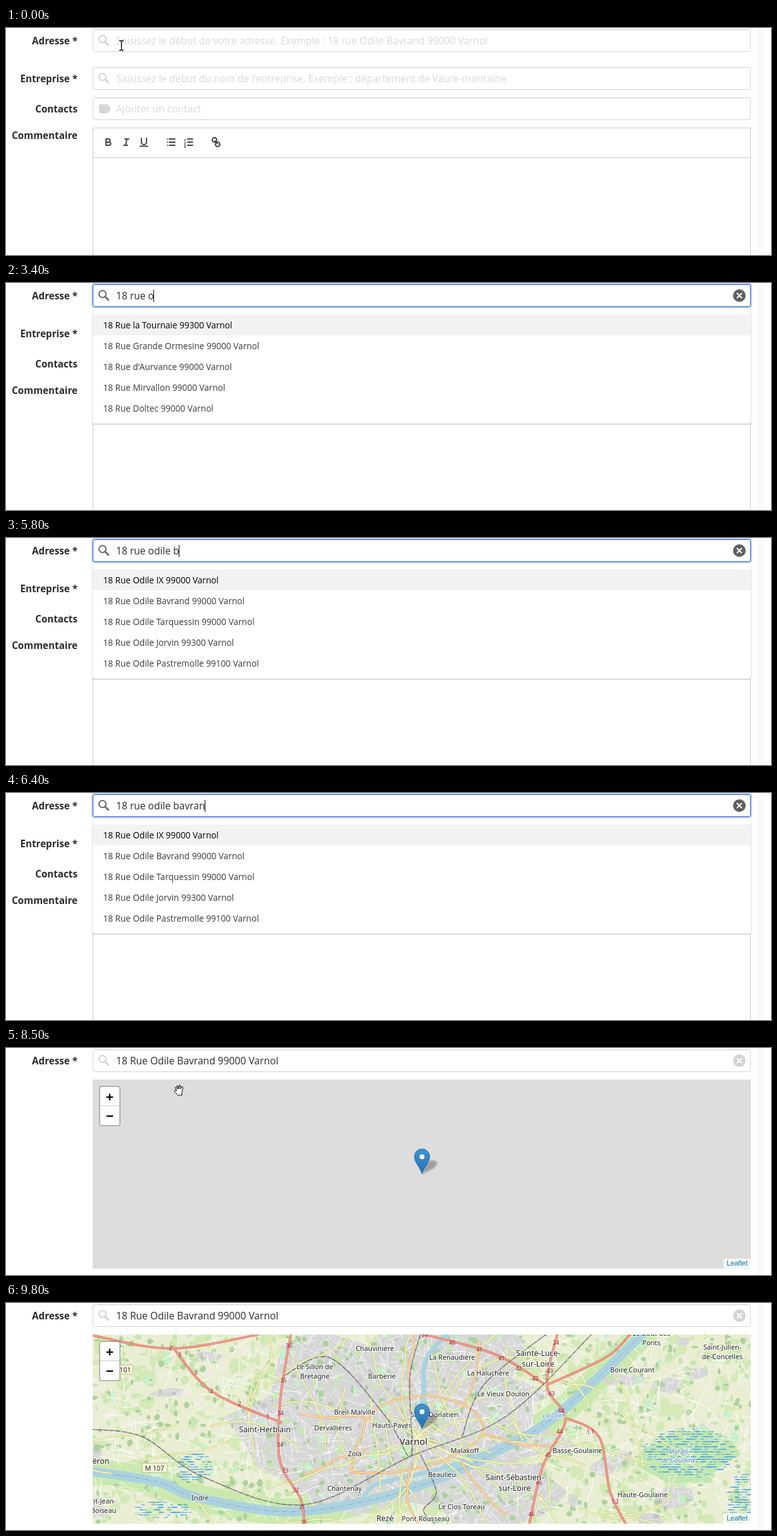
Recreate the animation shown at these times as an HTML page. Size 1209 by 360 pixels, loop 10 s.

```html
<!DOCTYPE html>
<html lang="fr">
<head>
<meta charset="utf-8">
<title>Saisie d'adresse</title>
<style>
html, body { margin: 0; width: 100%; height: 100%; overflow: hidden; background: #fff; }
svg { display: block; }
text { white-space: pre; font: 15.6px "Open Sans", "Noto Sans", sans-serif; fill: #2b2b2b; }
.label { font-weight: 700; font-size: 15.2px; text-anchor: end; }
.hint { fill: #d9d9d9; }
.option { font-size: 13.6px; fill: #383838; }
.first { fill: #000; }
.field { fill: #fff; stroke: #d4d4d4; }
.tool { fill: none; stroke: #444; stroke-width: 2; stroke-linecap: round; stroke-linejoin: round; }
.place { font-family: "Noto Sans", sans-serif; fill: #222; text-anchor: middle;
  paint-order: stroke; stroke: #fff; stroke-opacity: .7; stroke-width: 2.5px; stroke-linejoin: round; }
.water { font-style: italic; fill: #4f86b5; }
.exit { font: 8.5px "Noto Sans", sans-serif; fill: #9c1f38; text-anchor: middle; }
.zoom { font: bold 21px "Liberation Sans", Arial, sans-serif; fill: #000; text-anchor: middle; }
.credit { font: 11px "Liberation Sans", Arial, sans-serif; fill: #0078a8; }
</style>
</head>
<body>
<svg id="stage" width="1209" height="360" viewBox="0 0 1209 360"></svg>
<script>
const $ = id => document.getElementById(id);
const TOWN = 'Varnol';
const ADDRESS = `18 Rue Odile Bavrand 99000 ${TOWN}`;

// Bursts of typing: start, time per key, keys
const BURSTS = [[1600, 100, '18'], [2100, 100, ' rue '], [3400, 200, 'odil'], [5500, 150, 'e b'], [6000, 100, 'avrand']];

// Suggestions from a given time on; the digit completes the postcode
const LISTS = [
  [2500, "Rue la Tournaie 3|Rue Grande Ormesine 0|Rue d'Aurvance 0|Rue Mirvallon 0|Rue Doltec 0"],
  [3500, "Rue Octave Brimol 0|Rue des Ormelines 0|Rue d'Oustrelle 1|Rue Olvarde 0|Rue Orsenne 3"],
  [3900, "Rue Odette Larvin 0|Rue Odilon Tresque 0|Rue Odelin 1|Rue Odrance 0|Rue Odile IX 0"],
  [4400, "Rue Odile IX 0|Rue Odile Bavrand 0|Avenue Odile Tarquessin Morval 0|Rue Odile Jorvin 3|Allée Odile Pastremol 1"],
  [5600, "Rue Odile IX 0|Rue Odile Bavrand 0|Rue Odile Tarquessin 0|Rue Odile Jorvin 3|Rue Odile Pastremolle 1"],
  [6600, "Rue Odile Bavrand 0"]
];

/* ---------- form ---------- */
const text = (x, y, s, cls = '', extra = '') => `<text x="${x}" y="${y}" class="${cls}" ${extra}>${s}</text>`;
const field = (y, id = '') => `<rect id="${id}" class="field" x="137.5" y="${y + .5}" width="1039" height="35" rx="3"/>
  <path d="M140 ${y + 1.5}H1174" stroke="#f1f1f1"/>`;
const glass = (y, id = '') => `<g id="${id}" transform="translate(152.500 ${y})" fill="none" stroke="#d2d2d2" stroke-width="2">
  <circle r="5.500"/><path d="M4 4l6 6" stroke-width="2.600"/></g>`;
const tool = (x, d) => `<path class="tool" transform="translate(${x} 172)" d="${d}"/>`;
const rows3 = x => [4, 9, 14].map(y => `M${x} ${y}H15`).join('');
const link = 'M1 0a3.500 3.500 0 0 0-5-5 3.500 3.500 0 0 0 5 5z';

const form = `
  ${['Entreprise *', 'Contacts', 'Commentaire'].map((s, i) => text(113, [86, 134, 176][i], s, 'label')).join('')}
  ${field(62)}${glass(77.5)}
  ${text(174, 86, "Saisissez le début du nom de l'entreprise. Exemple : département de Vaure-maritaine", 'hint')}
  ${field(110)}
  <path d="M149 121H160q1 0 2 1l4 6-4 6q-1 1-2 1H149q-2 0-2-2V123q0-2 2-2z" fill="#d6d6d6"/>
  ${text(174, 134, 'Ajouter un contact', 'hint')}
  <path d="M137.500 361V158.500H1176.500V361M137.500 205.500H1176.500" fill="none" stroke="#c8c8c8"/>
  ${tool(153, 'M5 4H9a2.500 2.500 0 0 1 0 5H5zM5 9h5a2.500 2.500 0 0 1 0 5H5z')}
  ${tool(181, 'M7 4H13M5 14H11M8 14L10 4')}
  ${tool(209, 'M5 3V9a4 4 0 0 0 8 0V3M3 15.500H15')}
  ${tool(252, rows3(6) + 'M3 4h0M3 9h0M3 14h0')}
  ${tool(280, rows3(7))}
  ${[1, 2, 3].map(n => text(281, 174.5 + n * 5, n, '', 'style="font-size:6px;font-weight:700"')).join('')}
  ${tool(323, 'M7 7L11 11')}
  <g transform="translate(331 180)">${[0, 180].map(a => `<path class="tool" transform="translate(1 1) rotate(${a}) translate(-1 -1)" d="${link}"/>`).join('')}</g>`;

/* ---------- map ---------- */
let seed = 7;
const rnd = (a = 0, b = 1) => {
  seed = (seed * 16807) % 2147483647;
  return a + (b - a) * seed / 2147483647;
};
const times = (n, make) => Array.from({ length: n }, (_, i) => make(i));
const spot = () => [rnd(137, 1177), rnd(50, 350)];
const points = s => s.split(' ').map(p => p.split(',').map(Number));
const line = pts => 'M' + pts.map(p => p.map(v => v.toFixed(1))).join('L');

// Smooth open curve through the points
function curve(p) {
  const at = i => p[Math.max(0, Math.min(p.length - 1, i))];
  const lead = (q, r, s) => q.map((v, j) => (v + (s[j] - r[j]) / 6).toFixed(1));
  return 'M' + p[0] + p.slice(1).map((c, i) =>
    `C${lead(p[i], at(i - 1), c)} ${lead(c, at(i + 2), p[i])} ${c}`).join('');
}
const blob = (x, y, rx, ry = rx, n = 6) => line(times(n, i => {
  const a = i / n * 2 * Math.PI, r = rnd(.75, 1.2);
  return [x + rx * r * Math.cos(a), y + ry * r * Math.sin(a)];
})) + 'Z';
function wander(x, y, heading, steps, stride) {
  return times(steps, i => {
    if (i) {
      heading += rnd(-.35, .35);
      x += stride * Math.cos(heading);
      y += stride * Math.sin(heading);
    }
    return [x, y];
  });
}
const stroke = (d, color, width, dash = '') =>
  `<path d="${d}" fill="none" stroke="${color}" stroke-width="${width}" stroke-dasharray="${dash}"/>`;
const fill = (d, color) => `<path d="${d}" fill="${color}"/>`;
const road = (d, color, edge, width) => stroke(d, edge, width + 1.2) + stroke(d, color, width);
const patches = (n, color, size) => fill(times(n, () => blob(...spot(), rnd(2, size), rnd(2, size))).join(''), color);
const marsh = (cx, cy, rx, ry) => stroke(times(Math.round(rx * ry / 9), () => {
  const a = rnd(0, 6.28), r = Math.sqrt(rnd());
  return `M${Math.round(cx + rx * r * Math.cos(a))} ${Math.round((cy + ry * r * Math.sin(a)) / 4) * 4}h${Math.round(rnd(4, 9))}`;
}).join(''), '#3f9fe0', 1);
const streets = (n, size) => times(n, () => {
  const [x, y] = spot(), a = Math.atan2(y - 210, x - 650) + (rnd() < .5 ? 1.57 : 0) + rnd(-.5, .5);
  return line(wander(x, y, a, 3, rnd(size / 4, size / 2)));
}).join('');

const built = blob(625, 180, 250, 150, 24) + blob(765, 300, 105, 55, 16) +
  times(26, () => blob(...spot(), rnd(8, 30), rnd(7, 20), 9)).join('');
const loire = curve(points('130,266 240,284 300,308 440,331 565,315 680,280 790,228 880,170 1015,40'));
const arm = curve(points('565,314 585,288 690,262 780,228'));
const erdre = curve(points('655,190 660,140 664,90 700,45'));
const rails = ['130,200 215,212 310,275 470,320 640,243 790,180 930,45', '720,215 755,130 860,45',
  '440,115 512,87 600,180 640,243 638,120 655,50', '655,240 680,300 660,330 690,360'].map(s => curve(points(s))).join('');
const spokes = times(13, i => curve(wander(650, 212, i * .483, 9, 30))).join('') +
  times(34, () => curve(wander(...spot(), rnd(0, 6.28), 7, 26))).join('');
const boulevards = 'M565 205A95 55 0 0 1 755 200Q750 225 690 250T545 268Q550 230 565 205' +
  times(7, i => curve(wander(660 + 95 * Math.cos(i * .9), 208 + 55 * Math.sin(i * .9), i * .9, 5, 28))).join('');

// Motorways with the exits spaced along them
const MOTORWAYS = [
  ['130,50 260,72 400,50', '2'], ['262,68 325,140 436,190', '3 3 2 2 1'],
  ['452,40 434,150 433,250 466,312 472,360', '36 35 34 34 33 32 31 30'],
  ['640,45 770,80 850,128', '39 40 41 41 42 42'],
  ['874,40 855,130 884,185 848,260 825,360', '24 43 43 44 44 45 45 46'],
  ['884,182 937,212 955,300 985,360', '1.1 1.2'], ['855,130 950,85 990,45', '']
].map(([s, exits]) => [points(s), exits.split(' ')]);
const motorways = MOTORWAYS.map(m => curve(m[0])).join('');
const exitText = MOTORWAYS.map(([p, exits]) => exits.map((n, i) => {
  const k = (i + .5) / exits.length * (p.length - 1), j = Math.floor(k), f = k - j;
  const [x, y] = p[j].map((v, c) => v + (p[j + 1][c] - v) * f);
  return text(x.toFixed(1), (y + 3).toFixed(1), n, 'exit');
}).join('')).join('');

// "x y name", a slash breaks the line
const CITIES = `409 205 Saint-Herblain|841 84 Sainte-Luce-/sur-Loire|804 281 Saint-Sébastien-/sur-Loire|599 346 Rezé|150 255 ëron`;
const QUARTERS = `583 76 Chauvinière|705 90 La Renaudière|762 115 La Haluchère|488 105 Le Sillon de/Bretagne|594 120 Barberie|
786 148 Le Vieux Doulon|551 177 Breil-Malville|677 181 Saint-Donatien|517 202 Dervallières|610 198 Hauts-Pavés|551 243 Zola|
725 238 Malakoff|689 276 Beaulieu|535 298 Chantenay|720 327 Le Clos Toreau|663 346 Pont Rousseau|903 238 Basse-Goulaine|
1006 308 Haute-Goulaine|990 110 Boire Courant|1020 52 Le Bout des/Ponts|1132 74 Saint-Julien-/de-Concelles|307 313 Indre|154 318 nt-Jean-/Boiseau`;
const places = (list, size, cls = '') => list.split('|').map(item => {
  const [x, y, ...words] = item.trim().split(' ');
  return words.join(' ').split('/').map((s, i) =>
    text(x, +y + i * size * 1.36, s, 'place ' + cls, `style="font-size:${size}px"`)).join('');
}).join('');
const badge = (x, y, w, s) => `<rect x="${x}" y="${y}" width="${w}" height="15" rx="2" fill="#f4f5c8" stroke="#b9ba85"/>` +
  places(`${x + w / 2} ${y + 11.5} ${s}`, 10.5);

const tiles = `
  <rect x="137" y="50" width="1040" height="300" fill="#e9edd2"/>
  ${patches(500, '#d5e9b8', 14)}${patches(300, '#eeeede', 12)}
  ${stroke(loire, '#cbe9ae', 42)}
  ${fill(built, '#d6d6d6')}
  <g clip-path="url(#built)">${stroke(streets(3600, 18), '#f6f6f6', .8)}${patches(130, '#c6c6c6', 7)}</g>
  ${patches(420, '#c8e6b0', 7)}${patches(420, '#add19e', 6)}${patches(70, '#c5f0cc', 10)}
  ${fill(blob(1080, 240, 75, 42, 16), '#c4e6b2')}
  ${stroke(streets(420, 45), '#fff', 1)}
  ${stroke(erdre, '#aad3df', 8)}${stroke(arm, '#aad3df', 7)}${stroke(loire, '#aad3df', 15)}
  ${stroke(loire, '#9a8fb5', .8, '7 3 2 3')}
  ${marsh(1075, 238, 72, 38)}${marsh(1160, 310, 22, 42)}${marsh(296, 262, 28, 26)}${marsh(245, 328, 45, 12)}
  ${road(spokes, '#f7fabf', '#bfc380', 1.8)}${road(boulevards, '#fcd6a4', '#dca568', 2.2)}${road(motorways, '#f0a08f', '#d8604f', 2.4)}
  ${stroke(rails, '#666', 1.4)}${stroke(rails, '#ddd', .6, '5 5')}
  ${badge(176, 98, 25, '101')}${badge(215, 254, 40, 'M 107')}${exitText}
  ${places('866 182 La Loire|1063 239 Marais/de Goulaine', 10.2, 'water')}
  ${places(QUARTERS, 10.8)}${places(CITIES, 12.2)}${places('644 225 ' + TOWN, 14.5)}`;

const mapView = `
  <rect x="137" y="50" width="1040" height="300" fill="#ddd"/>
  <g id="tiles" clip-path="url(#frame)">${tiles}</g>
  <path d="M657 200L665 183Q674 174 681 181Q684 189 657 200z" opacity=".28" filter="url(#blur)"/>
  <path d="M657.500 199.500C655 190 645.500 182 645.500 172a12 12 0 0 1 24 0C669.500 182 660 190 657.500 199.500z" fill="url(#pin)" stroke="#2b6fa8"/>
  <circle cx="657.500" cy="172.500" r="4.500" fill="#fff" stroke="#2d75b0"/>
  <rect x="148" y="61" width="32" height="62" rx="3" fill="#fff" stroke="#000" stroke-opacity=".25" stroke-width="2"/>
  <path d="M149 91.500H179" stroke="#ccc"/>
  ${text(164, 85, '+', 'zoom')}${text(164, 115, '−', 'zoom')}
  <rect x="1134" y="334" width="43" height="16" fill="#fff" opacity=".7"/>${text(1139, 345, 'Leaflet', 'credit')}`;

/* ---------- cursors, drawn around their own centre ---------- */
const beam = 'M-3 -8H-1L.500 -6.500 2 -8H4M.500 -6.500V6M-3 7.500H-1L.500 6 2 7.500H4';
const shape = (d, inside = '#fff', edge = '#000') => `<path d="${d}" fill="${inside}" stroke="${edge}"/>`;
const CURSORS = {
  beam: stroke(beam, '#fff', 3) + stroke(beam, '#000', 1.4),
  hand: shape('M-3 1V-8Q-1.500 -10 0 -8V-2L6 0Q8 0 7 3L6 9H-2L-7 2Q-6 0 -3 2z'),
  grab: shape('M-3 1L-6 -4Q-5 -6 -2 -2L-3 -7Q-1 -9 0 -2L1 -8Q3 -9 3 -2L5 -6Q8 -6 5 3V8H-1L-7 2Q-7 -1 -3 1z'),
  arrow: shape('M-5 -8V6L-2 3 0 8 2 7 0 2H5z', '#000', '#fff')
};

$('stage').innerHTML = `
  <defs>
    <clipPath id="built"><path d="${built}"/></clipPath>
    <clipPath id="frame"><rect x="137" y="50" width="1040" height="300"/></clipPath>
    <linearGradient id="pin" x2="0" y2="1"><stop stop-color="#4193d0"/><stop offset="1" stop-color="#2470b0"/></linearGradient>
    <filter id="blur"><feGaussianBlur stdDeviation="1.500"/></filter>
    <filter id="shade" x="-5%" y="-10%" width="110%" height="125%"><feDropShadow dx="0" dy="1" stdDeviation="1" flood-opacity=".3"/></filter>
  </defs>
  <rect x="1189" width="9" height="360" fill="#fafafa"/><path d="M1189.500 0V360" stroke="#efefef"/>
  <g id="form">${form}</g>
  <g id="map">${mapView}</g>
  ${text(113, 26, 'Adresse *', 'label')}
  <rect id="ring" x="135" y="0" width="1044" height="40" rx="5" fill="#b9d2f6"/>
  ${field(2, 'address')}${glass(17.5, 'search')}
  ${text(174, 26, `Saisissez le début de votre adresse. Exemple : 18 rue Odile Bavrand 99000 ${TOWN}`, 'hint', 'id="hint"')}
  ${text(174, 26, '', '', 'id="value"')}
  <rect id="caret" y="11" width="1" height="19"/>
  <g id="clear"><circle cx="1159" cy="20" r="10"/><path d="M1155 16l8 8m0-8l-8 8" stroke="#fff" stroke-width="2"/></g>
  <g id="menu"><rect id="panel" x="137" y="42" width="1040" rx="3" fill="#fff" filter="url(#shade)"/>
    <rect x="137" y="50" width="1040" height="33" fill="#f2f2f2"/><g id="options"></g></g>
  <g id="cursor"></g>`;

/* ---------- timeline ---------- */
const show = (id, on) => $(id).style.display = on ? '' : 'none';
const within = (t, a, b) => t >= a && t < b;
const ramp = (t, a, b) => Math.max(0, Math.min(1, (t - a) / (b - a)));
const typed = t => BURSTS.map(([start, step, keys]) => keys.slice(0, Math.max(0, Math.floor((t - start) / step) + 1))).join('');

// From the field to the first suggestion, later up and out to the left
function pointer(t) {
  const go = ramp(t, 7600, 8000), up = ramp(t, 9300, 9500), out = ramp(t, 9500, 9700);
  return [182 + 91 * go - 68 * up - 110 * out, 28 + 39 * go - 39 * up + 87 * out];
}

function draw(t) {
  const chosen = t >= 8200, mapped = t >= 8500, focus = within(t, 500, 8300);
  const value = chosen ? ADDRESS : typed(t);
  const hover = within(t, 100, 500) || within(t, 9500, 9600);

  show('form', !mapped);
  show('map', mapped);
  $('tiles').style.opacity = ramp(t, 8500, 8900);

  show('ring', focus);
  $('address').style.stroke = focus ? '#2b63b8' : hover ? '#b4b4b4' : '';
  $('search').style.stroke = focus ? '#666' : '';
  $('clear').style.fill = focus ? '#5f5f5f' : '#d4d4d4';
  show('clear', value);
  show('hint', !value);
  $('value').textContent = value;
  $('caret').setAttribute('x', Math.round(173 + $('value').getComputedTextLength()));
  show('caret', within(t, 2100, 2800) || within(t, 3400, 5200) || within(t, 5500, 7600));

  const list = LISTS.filter(l => l[0] <= t).pop();
  const open = list && !chosen;
  show('menu', open);
  if (open) {
    const rows = list[1].split('|');
    $('panel').setAttribute('height', rows.length * 33 + 16);
    $('options').innerHTML = rows.map((row, i) =>
      text(153.5, 72 + 33 * i, `18 ${row.slice(0, -1)}99${row.slice(-1)}00 ${TOWN}`, i ? 'option' : 'option first')).join('');
  }

  const [x, y] = pointer(t);
  const kind = x < 137 ? 'arrow' : y < 40 ? 'beam' : mapped ? 'grab' : open ? 'hand' : 'beam';
  show('cursor', t < 1000 || within(t, 7700, 9800));
  $('cursor').innerHTML = CURSORS[kind];
  $('cursor').setAttribute('transform', `translate(${x} ${y})`);
}

let start, last;
function tick(now) {
  start ??= now;
  const t = Math.floor((now - start) % 10000 / 100) * 100;
  if (t !== last) draw(last = t);
  requestAnimationFrame(tick);
}
draw(0);
requestAnimationFrame(tick);
</script>
</body>
</html>
```
